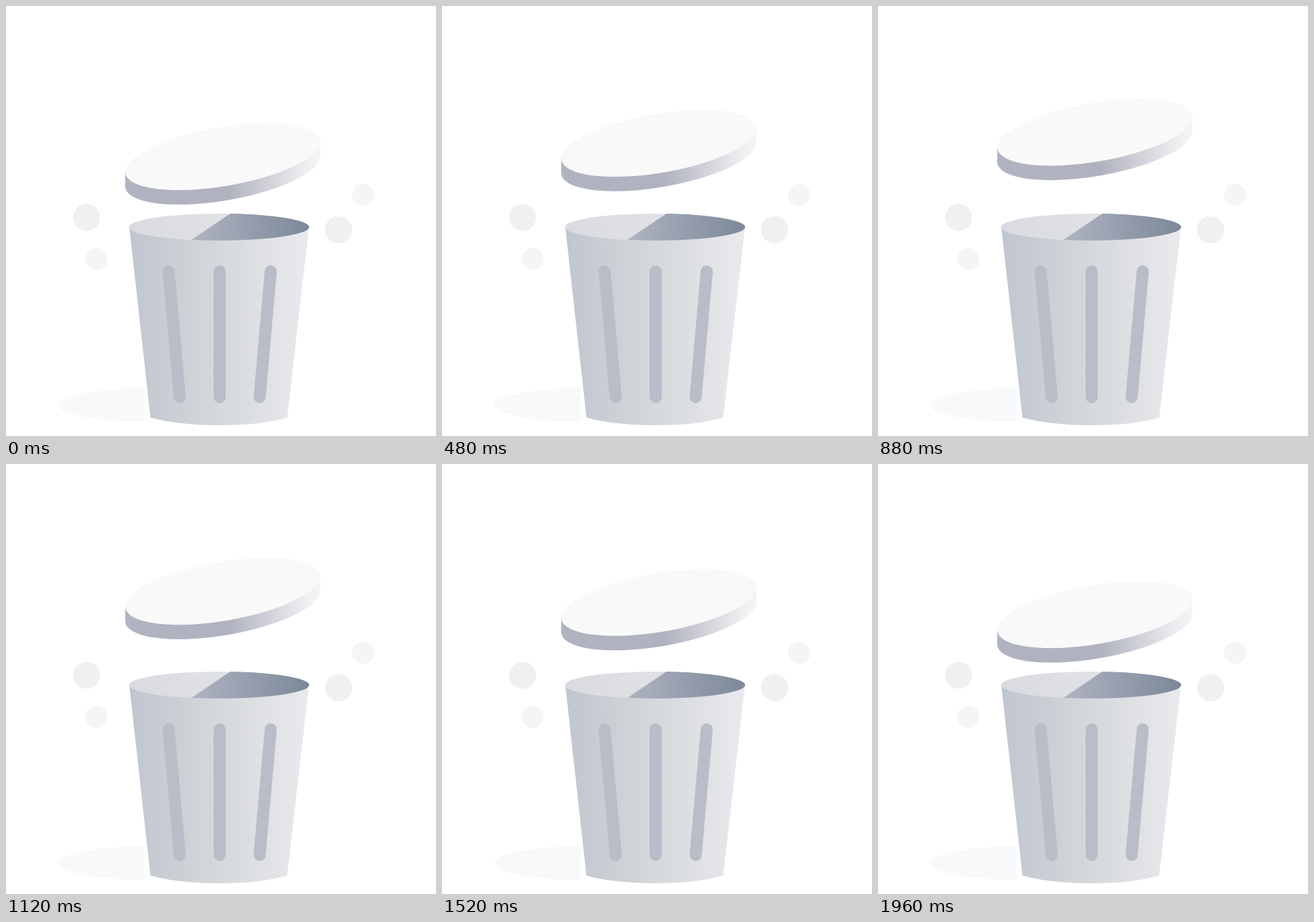
An HTML page that plays this animation: 640 px wide and 640 px high, repeating every 2 s.

```html
<!DOCTYPE html>
<html lang="en">
<head>
<meta charset="utf-8">
<title>Floating lid</title>
<style>
  html, body { margin: 0; width: 100%; height: 100%; overflow: hidden; background: #fff; }
  svg { display: block; width: 100%; height: 100%; }
</style>
</head>
<body>
<svg viewBox="0 0 640 640">
  <defs>
    <linearGradient id="body">
      <stop offset="0" stop-color="#c0c6cf"/>
      <stop offset=".42" stop-color="#d2d5d9"/>
      <stop offset="1" stop-color="#e9eaed"/>
    </linearGradient>
    <linearGradient id="inner">
      <stop offset="0" stop-color="#d9dbe0"/>
      <stop offset="1" stop-color="#e6e7ea"/>
    </linearGradient>
    <linearGradient id="shade">
      <stop offset="0" stop-color="#afb3c0"/>
      <stop offset="1" stop-color="#7c889a"/>
    </linearGradient>
    <linearGradient id="rim">
      <stop offset="0" stop-color="#b0b3c0"/>
      <stop offset=".53" stop-color="#b0b2bf"/>
      <stop offset=".92" stop-color="#eeeef1"/>
      <stop offset="1" stop-color="#f5f5f7"/>
    </linearGradient>
  </defs>

  <path d="M206 568C135 570 78 580 78 594C78 607 130 618 206 619.5Z" fill="#f8f9fb"/>
  <circle cx="120" cy="314.5" r="20" fill="#f0f0f2"/>
  <circle cx="135" cy="376.5" r="16.5" fill="#f5f5f5"/>
  <circle cx="531.5" cy="281" r="16.5" fill="#f5f5f5"/>
  <circle cx="495" cy="333" r="20.3" fill="#f0f0f2"/>

  <path d="M183.5 329L215 612.5Q255 624 317 624T418.500 612.500L451 329Z" fill="url(#body)"/>
  <ellipse cx="317.3" cy="329" rx="134" ry="20" fill="url(#inner)"/>
  <path d="M334 309.100A134 20 0 0 1 451.300 329A134 20 0 0 1 276 348Z" fill="url(#shade)"/>
  <path d="M242 395L258.500 582M318 395V582M394 395L377.500 582"
        stroke="#babdc8" stroke-width="18" stroke-linecap="round"/>

  <g id="lid">
    <path d="M177.400 246.800v21.500A147.200 43.850 -9.670 0 0 468 223.300v-21.500Z" fill="url(#rim)"/>
    <ellipse rx="147.2" ry="43.85" transform="translate(322.7 224.3) rotate(-9.67)" fill="#f9f9f9"/>
  </g>
</svg>
<script>
  const LOOP = 2000, STEP = 40, HALF = 980, RISE = 40.6;
  const lid = document.getElementById('lid');
  const start = performance.now();

  // The lid rises and falls at constant speed, in 25 steps per second.
  function draw() {
    const elapsed = (performance.now() - start) % LOOP;
    const t = Math.floor(elapsed / STEP) * STEP;
    const lift = RISE * (1 - Math.abs(1 - t / HALF));
    lid.setAttribute('transform', `translate(0 ${-lift})`);
    requestAnimationFrame(draw);
  }
  draw();
</script>
</body>
</html>
```
